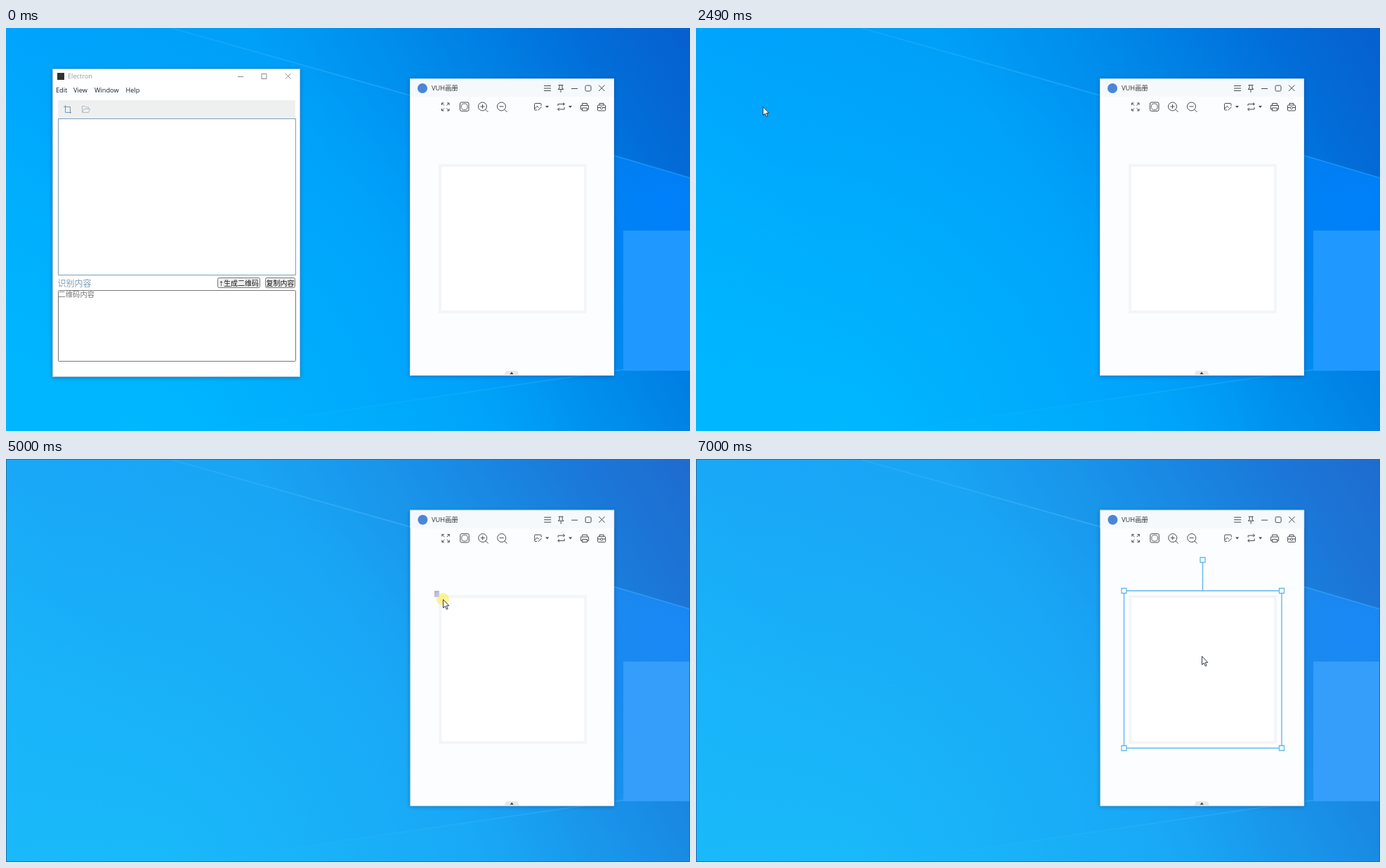
Animation, 974 px wide and 575 px high, one loop 8000 ms. Source, as an HTML page with a canvas:

```html
<!DOCTYPE html>
<html lang="zh">
<head>
<meta charset="utf-8">
<title>Screen capture</title>
<style>
html, body { margin: 0; width: 100%; height: 100%; overflow: hidden; background: #0098f6; }
canvas, svg { position: absolute; left: 0; top: 0; width: 974px; height: 575px; display: block; }
text { font-family: "Open Sans", "Noto Sans CJK SC", "Noto Sans CJK", sans-serif; font-size: 9.2px; fill: #123; white-space: pre; }
.cjk text { font-family: "Noto Sans CJK SC", "Noto Sans CJK", sans-serif; font-size: 10px; fill: #111; }
</style>
</head>
<body>
<canvas id="stage" width="974" height="575"></canvas>
<svg viewBox="0 0 974 575">
  <g id="appText">
    <text x="88" y="72.3" style="fill:#999">Electron</text>
    <text x="71" y="91.5">Edit</text>
    <text x="96" y="91.5">View</text>
    <text x="126" y="91.5">Window</text>
    <text x="170.5" y="91.5">Help</text>
    <g class="cjk">
      <text x="73.5" y="368.5" style="font-size:12px;fill:#7d9db8">识别内容</text>
      <text x="302.5" y="367.5" style="font-size:8px">↑</text>
      <text x="310" y="367.5">生成二维码</text>
      <text x="370.5" y="367.5">复制内容</text>
      <text x="74.5" y="384" style="font-size:10.3px;fill:#757575">二维码内容</text>
    </g>
  </g>
  <g id="tipText" class="cjk"><text x="89.5" y="146" style="font-size:9.1px;fill:#fff;font-weight:500">截图识别二维码</text></g>
  <g id="viewerText"><text x="606" y="88.8" style="font-size:9.3px;fill:#333">VUH画册</text></g>
</svg>
<script>
const W = 974, H = 575, LOOP = 8000;
const $ = id => document.getElementById(id);
const ctx = $("stage").getContext("2d");

// start time, pointer tip, drag end
const STEPS = [
  { at: 0 },
  { at: 500, tip: [604, 258] },
  { at: 990, tip: [483, 205] },
  { at: 1490, tip: [71, 111] },
  { at: 1990, tip: [83, 116], hover: true },
  { at: 2490, tip: [95, 112] },
  { at: 2990, tip: [680, 175] },
  { at: 3490, tip: [628, 175] },
  { at: 4000, tip: [625, 177] },
  { at: 4500, tip: [615, 185] },
  { at: 5000, tip: [622, 200], drag: [617, 197], glow: 0.5 },
  { at: 5500, tip: [772, 332], drag: [770, 331], glow: 0.8 },
  { at: 6000, tip: [832, 411], drag: [831, 409.5], glow: 0.8 },
  { at: 6500, tip: [829, 398] },
  { at: 7000, tip: [720, 281] }
];

function fill(color, x, y, w, h, r = 0) {
  ctx.fillStyle = color;
  ctx.beginPath();
  ctx.roundRect(x, y, w, h, r);
  ctx.fill();
}

function box(color, x, y, w, h, r = 0, width = 1) {
  ctx.strokeStyle = color;
  ctx.lineWidth = width;
  ctx.beginPath();
  ctx.roundRect(x, y, w, h, r);
  ctx.stroke();
}

function disc(color, x, y, r) {
  ctx.fillStyle = color;
  ctx.beginPath();
  ctx.arc(x, y, r, 0, Math.PI * 2);
  ctx.fill();
}

function path(color, d, width = 1) {
  ctx.strokeStyle = color;
  ctx.lineWidth = width;
  ctx.stroke(new Path2D(d));
}

function shape(color, d) {
  ctx.fillStyle = color;
  ctx.fill(new Path2D(d));
}

function gradient(g, stops) {
  stops.forEach(([p, c]) => g.addColorStop(p, c));
  return g;
}

function panel(color, x, y, w, h) {
  ctx.save();
  ctx.shadowColor = "rgba(0,40,100,.4)";
  ctx.shadowBlur = 6;
  ctx.shadowOffsetY = 1;
  fill(color, x, y, w, h);
  ctx.restore();
}

function wallpaper() {
  ctx.fillStyle = gradient(ctx.createLinearGradient(0, H, W, 0), [
    [0, "#00b6ff"], [0.26, "#00a4fc"], [0.52, "#009ff8"], [0.67, "#008dec"],
    [0.78, "#007de2"], [0.88, "#026dd8"], [1, "#075fcf"]
  ]);
  ctx.fillRect(0, 0, W, H);

  ctx.fillStyle = gradient(ctx.createRadialGradient(200, 640, 40, 200, 640, 640), [
    [0, "rgba(0,186,255,.9)"], [0.5, "rgba(0,182,255,.5)"], [1, "rgba(0,176,255,0)"]
  ]);
  ctx.fillRect(0, 0, W, H);

  const cone = "M0 0H235L575 96L974 214V474L770 503L300 572L0 575Z";
  shape(gradient(ctx.createLinearGradient(230, 0, W, 0), [
    [0, "rgba(0,165,255,0)"], [0.4, "rgba(0,160,255,.2)"], [1, "rgba(0,140,255,.35)"]
  ]), cone);
  shape(gradient(ctx.createRadialGradient(945, 250, 10, 945, 250, 190), [
    [0, "rgba(0,130,255,.8)"], [1, "rgba(0,130,255,0)"]
  ]), cone);

  const ray = gradient(ctx.createLinearGradient(230, 0, W, 0), [
    [0, "rgba(60,185,255,.25)"], [0.4, "rgba(50,175,255,.6)"], [1, "rgba(40,160,255,.6)"]
  ]);
  path(ray, "M235 0L575 96L974 214", 1.8);
  path(gradient(ctx.createLinearGradient(300, 0, W, 0), [
    [0, "rgba(40,185,255,0)"], [1, "rgba(40,185,255,.6)"]
  ]), "M300 572L770 503L974 474", 1.4);
  fill("#1f98ff", 879, 289, 200, 200);
}

function appWindow(hover) {
  panel("#fff", 66, 58, 353, 440);
  box("rgba(30,90,140,.35)", 66.5, 58.5, 352, 439);
  fill("#333", 73, 64, 10, 10);
  path("#888", "M330 69.5H338M364 65.5H371V72.5H364ZM398 65L405.5 72.5M405.5 65L398 72.5");

  fill("#eef0f0", 74, 103, 338, 27);
  path(hover ? "#a5adb3" : "#7795b0", "M84.5 110V120.5H93M82 112.5H91.5V122");
  path("#b4bbc0", "M108.5 120.5V111.5H112L113.5 113H117.5V115M108.5 120.5L111 115.5H119.5L117.5 120.5Z");

  box("#7b9fba", 74.5, 129.5, 338, 223);
  fill("#efefef", 301, 356, 61, 15, 2);
  box("#767676", 301.5, 356.5, 60, 14, 2);
  fill("#efefef", 369, 356, 43, 15, 2);
  box("#767676", 369.5, 356.5, 42, 14, 2);
  box("#767676", 74.5, 374.5, 338, 101, 1);
  if (hover) fill("#2c3034", 81, 131, 80, 24, 3);
}

function viewerIcons() {
  const ink = "#454a50";
  path(ink, "M766 82.5H776M766 86H776M766 89.5H776");
  path(ink, "M786.5 81.5H793.5M788 81.5V86L786 87.5H794L792 86V81.5M790 87.5V92");
  path(ink, "M805 86.5H814M844 81.5L852.5 90M852.5 81.5L844 90");
  box(ink, 825, 82, 8, 8, 1.5);

  path(ink, "M623.5 107H620.5V110M628 107H631V110M620.5 115V118H623.5M631 115V118H628"
    + "M620.5 107L624 110.5M631 107L627.5 110.5M620.5 118L624 114.5M631 118L627.5 114.5");
  box(ink, 646.5, 106, 12.5, 12.5, 2);
  box(ink, 648.5, 108, 8.5, 8.5, 3, 0.8);

  for (const x of [678.5, 705.5]) {
    ctx.lineWidth = 1;
    ctx.beginPath();
    ctx.arc(x, 112, 6, 0, Math.PI * 2);
    ctx.stroke();
    path(ink, `M${x + 4.3} 116.3L${x + 8} 120M${x - 3} 112H${x + 3}`);
  }
  path(ink, "M678.5 109V115");

  path(ink, "M762 111V108.5Q762 107.5 761 107.5H753.5Q752.5 107.5 752.5 108.5V116Q752.5 117 753.5 117H756"
    + "M753 115L756 111.5L758.5 113.5M757.5 117.5L762.5 112.5");
  path(ink, "M786 111V108.5H795M793 106.5L795.5 108.5L793 110.5M795 113V116H786M788 114L785.5 116L788 118");
  for (const x of [770.5, 803.5]) shape(ink, `M${x - 2.5} 111H${x + 2.5}L${x} 114Z`);

  path(ink, "M820.5 110V107.5H827.5V110M820.5 116H818.5V110.5H829.5V116H827.5M820.5 114H827.5V118H820.5Z");
  box(ink, 842.5, 110, 11, 8, 1);
  path(ink, "M845 110V107.5H851V110M842.5 113.5H846M850 113.5H853.5");
  box(ink, 846.5, 112.5, 3, 3, 1);
}

function viewer() {
  panel("#fcfdff", 575, 72, 291, 424);
  fill("#f6f9fc", 575, 72, 291, 26);
  box("rgba(40,110,170,.15)", 575.5, 72.5, 290, 423);
  disc("#4a86d6", 593, 86, 7);
  viewerIcons();
  fill("#f4f5f8", 616, 194, 211, 213);
  fill("#fff", 620, 198, 203, 205);
  shape("#e6e8ea", "M709 495.5L712 489H728L731 495.5Z");
  shape("#444", "M717.5 494L720 490.5L722.5 494Z");
}

function selection([x, y]) {
  fill("rgba(0,0,255,.25)", 610, 188, x - 610, y - 188);
  shape("rgba(185,185,150,.7)", "M610 188H617L610 195Z");
}

function handles() {
  const line = "#62b8ee";
  box(line, 609.5, 188, 224.5, 224.5, 0, 1.4);
  path(line, "M721.5 144V188", 1.4);
  for (const [x, y] of [[609.5, 188], [834, 188], [609.5, 412.5], [834, 412.5], [721.5, 144]]) {
    fill("#fff", x - 3.5, y - 3.5, 7, 7);
    box(line, x - 3.5, y - 3.5, 7, 7, 0, 1.3);
  }
}

function pointer([x, y]) {
  ctx.save();
  ctx.translate(x + 0.5, y + 0.5);
  const arrow = "M0 0V12L2.8 9.5L4.8 14L6.6 13.2L4.7 8.8H8.3Z";
  shape("#fff", arrow);
  path("#1c2430", arrow, 0.9);
  ctx.restore();
}

function draw(step) {
  const t = step.at, frozen = t >= 5000, app = t < 2490;
  ctx.clearRect(0, 0, W, H);
  ctx.save();
  if (frozen) {
    ctx.translate(1, 1);
    ctx.scale((W - 1) / W, (H - 2) / H);
  }
  wallpaper();
  if (frozen) fill("rgba(200,195,215,.12)", 0, 0, W, H);
  if (app) appWindow(step.hover);
  viewer();
  ctx.restore();

  if (frozen) box("#1a70ad", 0.5, 0.5, W - 1, H - 1);
  if (step.drag) selection(step.drag);
  if (t >= 6500) handles();
  if (step.glow) disc(`rgba(255,236,45,${step.glow})`, ...step.tip, 9);
  if (step.tip) pointer(step.tip);

  $("appText").style.display = app ? "" : "none";
  $("tipText").style.display = step.hover ? "" : "none";
  $("viewerText").setAttribute("transform", frozen ? "translate(0 1)" : "");
}

let shown, start;
function tick(now) {
  start ??= now;
  const t = (now - start) % LOOP;
  const step = STEPS.findLast(s => s.at <= t) || STEPS[0];
  if (step !== shown) draw(shown = step);
  requestAnimationFrame(tick);
}
draw(shown = STEPS[0]);
requestAnimationFrame(tick);
</script>
</body>
</html>
```
